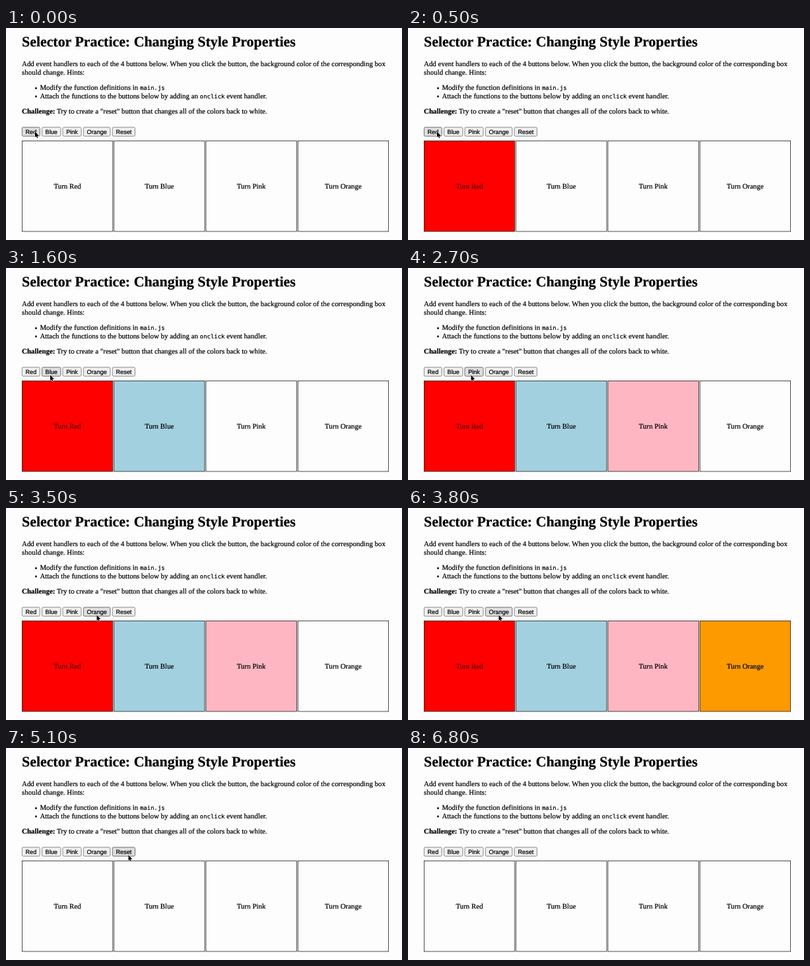
Write an HTML page that moves like this. It is 600 px wide and 322 px high and loops after 7900 ms.

```html
<!DOCTYPE html>
<html lang="en">
<head>
<meta charset="utf-8">
<title>Selector Practice</title>
<style>
  html, body { margin: 0; width: 100%; height: 100%; overflow: hidden; background: #fdfdfd; }
  svg { display: block; width: 100%; height: 100%; }
  text {
    font: 10.94px "Liberation Serif", "Times New Roman", serif;
    fill: #000; stroke: #000; stroke-width: 0.22; text-rendering: geometricPrecision;
  }
  .title { font-size: 21.88px; font-weight: bold; }
  .bold { font-weight: bold; }
  .code { font: 8.95px "DejaVu Sans Mono", monospace; }
  .mid { text-anchor: middle; }
  .label { font: 9.12px "Liberation Sans", Arial, sans-serif; text-anchor: middle; }
</style>
</head>
<body>
<svg id="stage" viewBox="0 0 600 322">
  <rect width="600" height="322" fill="#fdfdfd"/>
  <text class="title" x="24" y="28">Selector Practice: Changing Style Properties</text>
  <text x="24" y="58">Add event handlers to each of the 4 buttons below. When you click the button, the background color of the corresponding box</text>
  <text x="24" y="70.5">should change. Hints:</text>
  <circle cx="45.5" cy="91.5" r="1.4"/>
  <text x="51.4" y="94.3">Modify the function definitions in <tspan class="code">main.js</tspan></text>
  <circle cx="45.5" cy="104" r="1.4"/>
  <text x="51.4" y="106.8">Attach the functions to the buttons below by adding an <tspan class="code">onclick</tspan> event handler.</text>
  <text x="24" y="130"><tspan class="bold">Challenge:</tspan> Try to create a "reset" button that changes all of the colors back to white.</text>
</svg>
<script>
const LOOP = 7900, STEP = 100, RESET = 5100, HIDE = 6800;
const PAPER = '#fdfdfd';
const stage = document.getElementById('stage');

function add(tag, attrs, text) {
  const el = document.createElementNS('http://www.w3.org/2000/svg', tag);
  for (const k in attrs) el.setAttribute(k, attrs[k]);
  if (text) el.textContent = text;
  return stage.appendChild(el);
}

// label, left edge, width, click time
const buttons = [
  ['Red', 24.4, 26.9, 500],
  ['Blue', 54.5, 28.4, 1600],
  ['Pink', 86, 28, 2700],
  ['Orange', 117.4, 40.5, 3800],
  ['Reset', 161.3, 34.2, RESET]
].map(([name, x, w, click]) => {
  const face = add('rect', { x, y: 150.8, width: w, height: 13.5, rx: 1.7, 'stroke-width': 0.75 });
  add('text', { class: 'label', x: x + w / 2, y: 160.8 }, name);
  return { name, x, w, click, face };
});

const boxes = ['#fe0000', '#a3d0df', '#fdb6c2', '#fd9a00'].map((color, i) => {
  const { name, click } = buttons[i];
  const x = 24.35 + 139.3 * i;
  const face = add('rect', { x, y: 171.4, width: 137.4, height: 137.6, stroke: '#000', 'stroke-width': 0.7 });
  const label = add('text', { class: 'mid', x: x + 68.7, y: 244 }, 'Turn ' + name);
  return { color, face, label, click };
});

const cursor = add('path', {
  d: 'M0 0V8.6L1.9 6.9 3.2 9.8 4.5 9.2 3.2 6.4 5.9 6.2Z',
  fill: '#000', stroke: '#fff', 'stroke-width': 1, 'paint-order': 'stroke'
});

// first step, last step, x, y
const moves = [
  [800, 1100, 67, 162.5],
  [2000, 2300, 95.5, 162.5],
  [3000, 3300, 137.5, 162.5],
  [4400, 4800, 185.5, 162.5],
  [6300, 6600, 456.5, 14.5]
];

function cursorAt(t) {
  let x = 44, y = 157.5;
  for (const [start, end, tx, ty] of moves) {
    const p = Math.min(1, Math.max(0, (t - start + STEP) / (end - start + STEP)));
    const e = p * p * (3 - 2 * p);
    x += (tx - x) * e;
    y += (ty - y) * e;
  }
  return [x, y];
}

function draw(ms) {
  const t = Math.floor((ms % LOOP) / STEP) * STEP;
  const [x, y] = cursorAt(t);
  const shown = t < HIDE;
  cursor.setAttribute('transform', `translate(${x} ${y})`);
  cursor.setAttribute('visibility', shown ? 'visible' : 'hidden');

  for (const b of buttons) {
    const over = shown && x >= b.x && x <= b.x + b.w && y > 150 && y < 165;
    const down = t === b.click - STEP;
    b.face.setAttribute('fill', over ? (down ? '#e6e6e6' : '#dedede') : '#efefef');
    b.face.setAttribute('stroke', over ? '#484848' : '#686868');
  }
  boxes.forEach((b, i) => {
    const on = t >= b.click && t < RESET;
    const ink = on && i === 0 ? '#5a0606' : '#000';
    b.face.setAttribute('fill', on ? b.color : PAPER);
    b.label.style.fill = b.label.style.stroke = ink;
  });
}

const begin = performance.now();
function tick() {
  draw(performance.now() - begin);
  requestAnimationFrame(tick);
}
tick();
</script>
</body>
</html>
```
